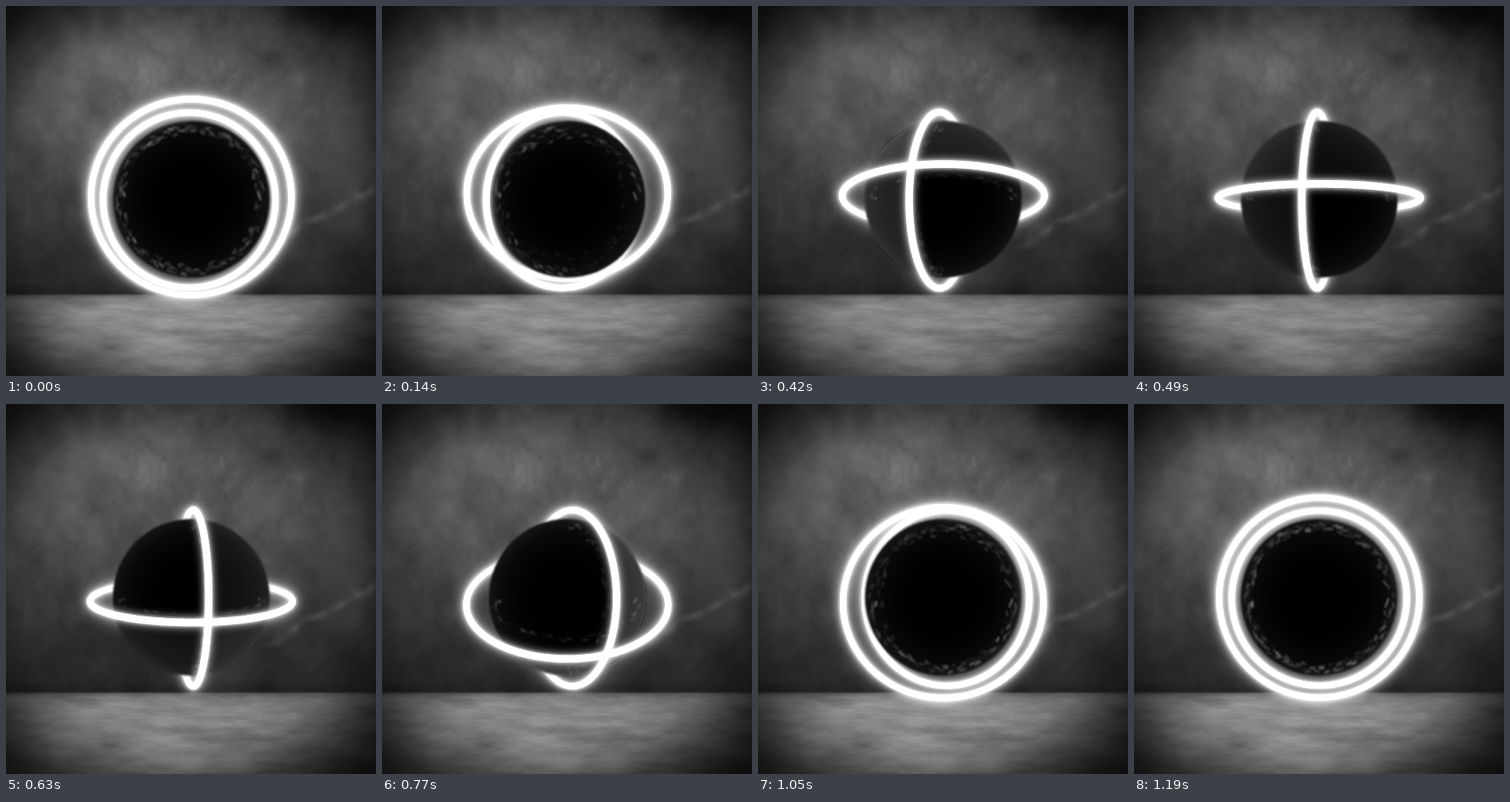
Recreate the animation shown at these times as an HTML page with a canvas. Size 425 by 425 pixels, loop 1.26 s.

```html
<!DOCTYPE html>
<html lang="en">
<head>
<meta charset="utf-8">
<title>Neon rings</title>
<style>
html, body { margin: 0; width: 100%; height: 100%; overflow: hidden; background: #111; }
canvas { display: block; width: 100vw; height: 100vh; }
</style>
</head>
<body>
<canvas id="stage" width="425" height="425"></canvas>
<script>
const SIZE = 425, STEP = 70, STEPS = 18;
const CX = 212.8, CY = 223, BALL = 90, CAMERA = 6.7, HORIZON = 331;
const RINGS = [
  { radius: 115, phase: 12, flat: true },
  { radius: 100.5, phase: 10, flat: false }
];
const ctx = document.getElementById('stage').getContext('2d');

function hash(x, y) {
  let h = Math.imul(x, 374761393) + Math.imul(y, 668265263);
  h = Math.imul(h ^ (h >>> 13), 1274126177);
  return ((h ^ (h >>> 16)) >>> 0) / 4294967296;
}
const smooth = t => t * t * (3 - 2 * t);
const clamp = t => Math.min(1, Math.max(0, t));
const mix = (a, b, t) => a + (b - a) * t;
const bump = (x, y, cx, cy, rx, ry) => Math.exp(-(((x - cx) / rx) ** 2) - ((y - cy) / ry) ** 2);

function noise(x, y) {
  const i = Math.floor(x), j = Math.floor(y), u = smooth(x - i), v = smooth(y - j);
  return mix(mix(hash(i, j), hash(i + 1, j), u), mix(hash(i, j + 1), hash(i + 1, j + 1), u), v);
}
// Layered noise centred on zero
function cloud(x, y, layers) {
  let sum = 0, amp = 0.5;
  for (let i = 0; i < layers; i++, amp *= 0.62, x = x * 2 + 17, y = y * 2 + 31) sum += (noise(x, y) - 0.5) * amp;
  return sum;
}

function wallTone(x, y) {
  let tone = 35 + 58 * bump(x, y, 190, 105, 260, 165);
  tone *= 1 + 0.6 * cloud(x / 50, y / 60, 6);
  const patches = Math.max(0, cloud(x / 26 + 9, y / 42, 5) - 0.06);
  tone += 85 * patches * bump(x, y, 235, 65, 120, 65);
  const crack = y - (275 - (x - 300) * 0.55) + 8 * cloud(x / 18, 4, 2);
  if (x > 285) tone += 34 * Math.exp(-((crack / 6) ** 2)) * clamp((x - 285) / 50) * noise(x / 11, y / 11);
  tone -= 35 * bump(x, y, 365, 5, 65, 28);
  return tone - 8 * clamp((y - 316) / 15);
}

function floorTone(x, y) {
  let tone = 52 + 92 * bump(x, y, 200, 360, 220, 75);
  tone *= 1 + 0.5 * cloud(x / 60, y / 16, 5);
  tone -= 28 * bump(x, y, 205, 374, 50, 6);
  return tone * mix(0.75, 1, clamp((y - HORIZON) / 6));
}

function makeRoom() {
  const room = document.createElement('canvas');
  room.width = room.height = SIZE;
  const c = room.getContext('2d'), img = c.createImageData(SIZE, SIZE);
  for (let y = 0, p = 0; y < SIZE; y++) {
    for (let x = 0; x < SIZE; x++, p += 4) {
      const edge = smooth(clamp((Math.hypot(x - 205, y - 212) - 180) / 130));
      const edgeMix = smooth(clamp((y - HORIZON + 2) / 4));
      const tone = mix(wallTone(x, y), floorTone(x, y), edgeMix) * (1 - 0.78 * edge);
      img.data[p] = img.data[p + 1] = img.data[p + 2] = tone;
      img.data[p + 3] = 255;
    }
  }
  c.putImageData(img, 0, 0);
  return room;
}

// Point on a tilted circle; a runs 0..PI on the near half, PI..2PI on the far half
function project(ring, radius, angle, a) {
  const along = Math.cos(a), out = Math.sin(a);
  const depth = out * Math.sin(angle);
  const k = CAMERA / (CAMERA - depth * radius / 115);
  const u = radius * along * k, v = -radius * out * Math.cos(angle) * k;
  return ring.flat ? { x: CX + u, y: CY + v, k } : { x: CX + v, y: CY + u, k };
}

function arc(ring, angle, from, to) {
  const pts = [];
  for (let i = 0; i <= 72; i++) pts.push(project(ring, ring.radius, angle, mix(from, to, i / 72)));
  return pts;
}

function glow(pts, width, blur, alpha) {
  ctx.save();
  ctx.globalCompositeOperation = 'screen';
  ctx.filter = `blur(${blur}px)`;
  ctx.strokeStyle = `rgba(255,255,255,${alpha})`;
  ctx.lineWidth = width;
  ctx.beginPath();
  pts.forEach(p => ctx.lineTo(p.x, p.y));
  ctx.stroke();
  ctx.restore();
}

function tube(pts) {
  glow(pts, 13, 4.5, 0.55);
  glow(pts, 10, 1.8, 0.65);
  ctx.strokeStyle = '#fff';
  ctx.lineCap = 'round';
  for (let i = 1; i < pts.length; i++) {
    ctx.lineWidth = 7.4 * pts[i].k;
    ctx.beginPath();
    ctx.moveTo(pts[i - 1].x, pts[i - 1].y);
    ctx.lineTo(pts[i].x, pts[i].y);
    ctx.stroke();
  }
  ctx.lineCap = 'butt';
}

function ballPath() {
  ctx.beginPath();
  ctx.arc(CX, CY - 1, BALL, 0, 7);
}

function ball() {
  const g = ctx.createRadialGradient(CX, CY, 0, CX, CY, BALL);
  g.addColorStop(0, '#000');
  g.addColorStop(0.6, '#020202');
  g.addColorStop(0.85, '#090909');
  g.addColorStop(1, '#141414');
  ctx.save();
  ctx.filter = 'blur(1px)';
  ctx.fillStyle = g;
  ballPath();
  ctx.fill();
  ctx.restore();
}

// Haze on the part of the ball that lies outside a ring's near half
function haze(ring, angle, pts) {
  const tilt = Math.cos(angle), far = -150 * Math.sign(tilt);
  const first = pts[0], last = pts[pts.length - 1];
  ctx.save();
  ballPath();
  ctx.clip();
  ctx.globalCompositeOperation = 'screen';
  ctx.filter = 'blur(3px)';
  ctx.fillStyle = `rgba(255,255,255,${0.34 * Math.abs(tilt)})`;
  ctx.beginPath();
  pts.forEach(p => ctx.lineTo(p.x, p.y));
  for (const p of [last, first]) {
    if (ring.flat) ctx.lineTo(p.x, CY + far);
    else ctx.lineTo(CX + far, p.y);
  }
  ctx.fill();
  ctx.restore();
}

// Broken, rippled glints of a ring on the dark surface
function glints(ring, angle, seed) {
  const face = Math.cos(angle) ** 2;
  ctx.save();
  ballPath();
  ctx.clip();
  ctx.filter = 'blur(0.8px)';
  for (let layer = 0; layer < 2; layer++) {
    for (let i = 0; i < 96; i++) {
      const a = i / 48 * Math.PI;
      const power = i < 48 ? 0.1 + 0.22 * face + 0.25 * Math.cos(a) ** 2 : 0.34 * face ** 4;
      const strength = power * hash(i + 100 * layer, seed) ** 2;
      if (strength < 0.03) continue;
      const radius = 87 - 9 * hash(i, seed + 5 + layer);
      const p = project(ring, radius, angle, a), q = project(ring, radius - 2, angle, a + 0.08);
      ctx.strokeStyle = `rgba(190,190,190,${strength})`;
      ctx.lineWidth = 1 + 2 * hash(i, seed + 9);
      ctx.beginPath();
      ctx.moveTo(p.x, p.y);
      ctx.lineTo(q.x, q.y);
      ctx.stroke();
    }
  }
  ctx.restore();
}

const room = makeRoom();

function draw(step) {
  const angles = RINGS.map(r => (r.phase + step * 180 / STEPS) * Math.PI / 180);
  const near = RINGS.map((r, i) => arc(r, angles[i], 0, Math.PI));
  const far = RINGS.map((r, i) => arc(r, angles[i], Math.PI, 2 * Math.PI));
  ctx.drawImage(room, 0, 0);
  ctx.fillStyle = `rgba(0,0,0,${0.06 * Math.sin(angles[1]) ** 2})`;
  ctx.fillRect(0, 0, SIZE, SIZE);
  [...near, ...far].forEach(pts => glow(pts, 18, 10, 0.26));
  far.forEach(tube);
  ball();
  RINGS.forEach((r, i) => {
    haze(r, angles[i], near[i]);
    glints(r, angles[i], 11 + 40 * i);
  });
  near.forEach(tube);
}

let shown = -1;
function tick() {
  const step = Math.floor(performance.now() / STEP + 0.01) % STEPS;
  if (step !== shown) draw(shown = step);
  requestAnimationFrame(tick);
}
tick();
</script>
</body>
</html>
```
